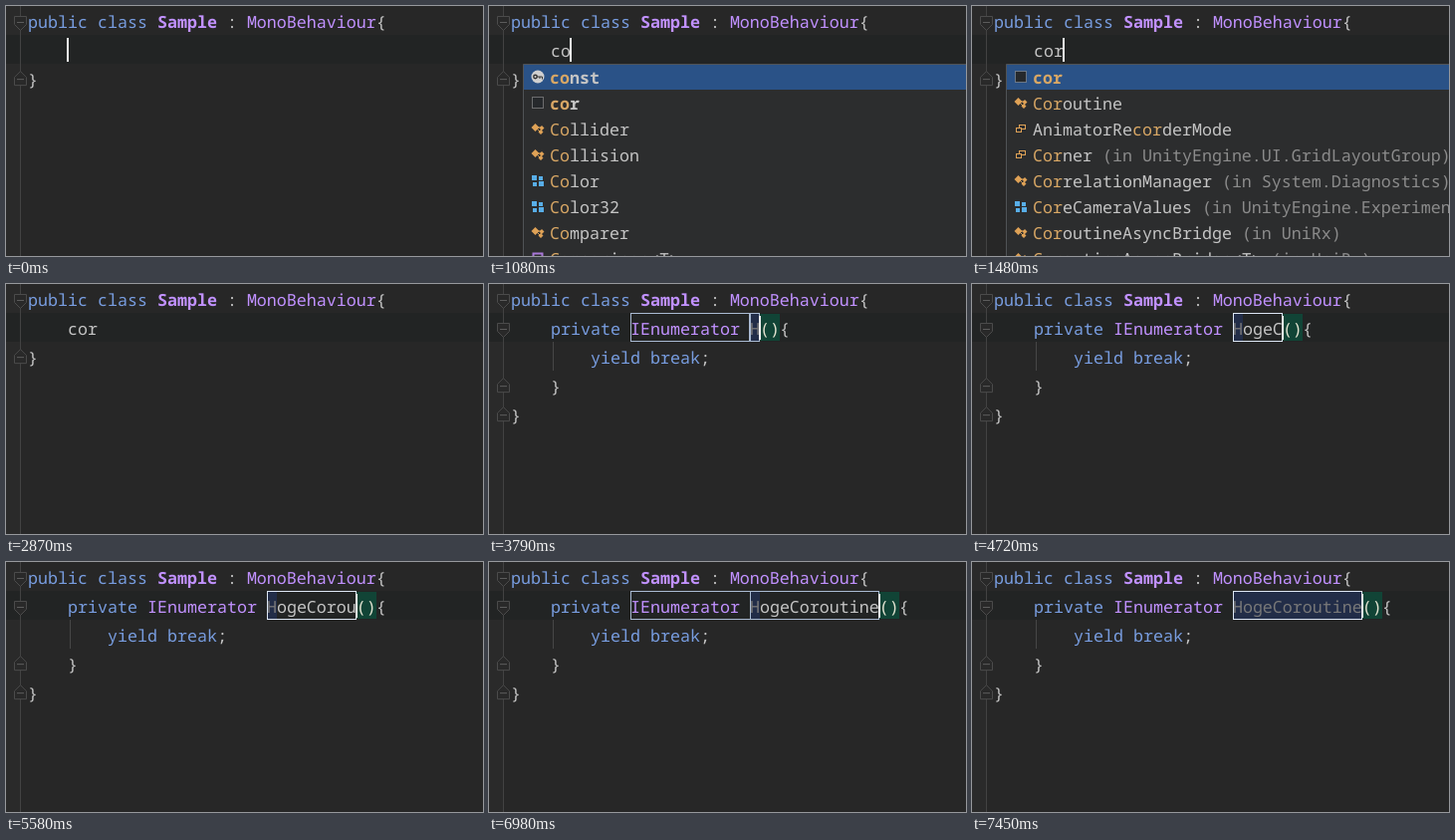
An HTML page for the animation above (7.77 s loop, 479 by 251 pixels).

```html
<!DOCTYPE html>
<html>
<head>
<meta charset="utf-8">
<style>
html, body { margin: 0; width: 100%; height: 100%; overflow: hidden; background: #272727; }
svg { display: block; }
text {
  font: 16.667px "Noto Sans Mono", "DejaVu Sans Mono", monospace;
  white-space: pre;
  text-rendering: geometricPrecision;
}
</style>
</head>
<body>
<svg id="stage" width="479" height="251" viewBox="0 0 479 251"></svg>
<script>
const LOOP = 7770, CH = 10, ROW = 29, NAME = 'HogeCoroutine', NAME_X = 262;
const KEY = '#789de0', TYPE = '#c191ff', PLAIN = '#c4c4c4', DIM = '#787878';
const MATCH = '#d8a765', SELECT = '#222d48', PAREN = '#114436';

// [time, typed length]
const PREFIX = [[0, 0], [700, 1], [1080, 2], [1400, 3]];
const TYPING = [[0, 0], [3790, 1], [3940, 2], [4190, 4], [4720, 5], [5120, 6], [5350, 7],
  [5500, 8], [5580, 9], [5730, 10], [5800, 11], [5880, 12], [6050, 13]];
// [time, left, right] of the template field outline; right 0 follows the name
const FIELD = [[0, 0, -1], [3030, 142, 252], [3790, 142, 262], [3870, 142, 272], [3940, 142, 0],
  [4020, NAME_X, 0], [6980, 142, 0], [7050, 142, 320], [7130, 142, 252], [7450, NAME_X, 0]];

const LIST_CO = [
  ['key', 'const'], ['snippet', 'cor'], ['class', 'Collider'], ['class', 'Collision'],
  ['struct', 'Color'], ['struct', 'Color32'], ['class', 'Comparer'], ['delegate', 'Comparison<T>']
];
const LIST_COR = [
  ['snippet', 'cor'], ['class', 'Coroutine'], ['enum', 'AnimatorRecorderMode'],
  ['enum', 'Corner', 'UnityEngine.UI.GridLayoutGroup'],
  ['class', 'CorrelationManager', 'System.Diagnostics'],
  ['struct', 'CoreCameraValues', 'UnityEngine.Experimental.Rendering'],
  ['class', 'CoroutineAsyncBridge', 'UniRx'], ['class', 'CoroutineAsyncBridge<T>', 'UniRx']
];

const at = (steps, t) => steps.filter(s => s[0] <= t).pop();
const esc = s => s.replace(/</g, '&lt;');
const rect = (x, y, w, h, fill, more = '') =>
  `<rect x="${x}" y="${y}" width="${w}" height="${h}" fill="${fill}" ${more}/>`;
const path = (d, stroke, fill = 'none', more = '') =>
  `<path d="${d}" stroke="${stroke}" fill="${fill}" ${more}/>`;
const text = (x, y, ...parts) => `<text x="${x}" y="${y}">` + parts.map(([fill, s, bold]) =>
  `<tspan fill="${fill}"${bold ? ' font-weight="700"' : ''}>${esc(s)}</tspan>`).join('') + '</text>';
const line = (row, x, ...parts) => text(x, 22 + ROW * row, ...parts);
const caret = x => rect(x - 1, 32, 2, 24, '#f0f0f0');

function fold(row, up) {
  const y = 16.5 + ROW * row, s = up ? -1 : 1;
  return path(`M8.5 ${y - 6 * s}H20.5V${y + 2 * s}L14.5 ${y + 8 * s}L8.5 ${y + 2 * s}Z`, '#4b4b4b', '#292929') +
    path(`M11 ${y}h7`, '#5c5c5c');
}

function icon(kind, y) {
  const box = (x, dy, w, c) => rect(x, y + dy, w, w, c);
  switch (kind) {
    case 'key':
      return `<circle cx="49" cy="${y}" r="6.5" fill="#d0d0d0"/><circle cx="46.5" cy="${y}" r="1.7" fill="none" stroke="#333" stroke-width="1.4"/>` +
        path(`M48 ${y}h5.5v2.5M51 ${y}v2`, '#333');
    case 'snippet':
      return rect(43.5, y - 5.5, 11, 11, '#26292c', 'stroke="#b0b0b0" stroke-dasharray="1 1"');
    case 'class':
      return path(`M46.5 ${y - 5}l4 4l-4 4l-4-4Z M53 ${y - 3}l2.5 2.5l-2.5 2.5l-2.5-2.5Z M52 ${y + 1}l2.5 2.5l-2.5 2.5l-2.5-2.5Z`, 'none', '#dfa256') +
        path(`M47 ${y - 1}h5M48 ${y}l4 4`, '#dfa256');
    case 'struct':
      return box(43, -5, 5, '#58aee8') + box(50, -4, 4, '#58aee8') +
        box(44, 2, 4, '#58aee8') + box(50, 1, 5, '#58aee8');
    case 'enum':
      return rect(47.5, y - 3.5, 6, 4, 'none', 'stroke="#dfa256"') +
        rect(44.5, y - .5, 5, 4, '#2d2e30', 'stroke="#dfa256"');
    default:
      return rect(44.5, y - 4.5, 9, 9, 'none', 'stroke="#a878d8" stroke-width="2"');
  }
}

function popup(list, query) {
  let out = rect(34, 58, 446, 194, '#2c2d2e') + rect(35, 58, 445, 26, '#2a5287') +
    path('M34.5 251V58.5H479', '#505356');
  list.forEach(([kind, name, space], i) => {
    const y = 72 + 26 * i, bold = kind == 'key' || kind == 'snippet';
    const from = name.toLowerCase().indexOf(query), to = from + query.length;
    out += icon(kind, y - 1) + text(61, y + 6, [PLAIN, name.slice(0, from), bold],
      [MATCH, name.slice(from, to), bold], [PLAIN, name.slice(to), bold],
      ['#8b8b8b', space ? ` (in ${space})` : '']);
  });
  return out;
}

function prefixScene(t) {
  const n = at(PREFIX, t)[1];
  let out = fold(1.97, true) + line(1, 62, [PLAIN, 'cor'.slice(0, n)]) + line(2, 22, [PLAIN, '}']);
  if (t < 380 || t >= 700 && t < 2410) out += caret(62 + CH * n);
  if (t >= 780 && t < 2870) out += t < 1480 ? popup(LIST_CO, n > 1 ? 'co' : 'c') : popup(LIST_COR, 'cor');
  return out;
}

function templateScene(t) {
  const n = at(TYPING, t)[1], end = NAME_X + CH * n;
  const [, left, r] = at(FIELD, t), right = r || end;
  const onName = t >= 3790 && t < 7050 || t >= 7450;
  const dim = t >= 7300 ? n : Math.min(n, 1);
  let out = fold(1) + fold(2.97, true) + fold(3.97, true);
  if (t >= 3180) out += rect(64, 58, 1, ROW, '#474747');
  if (right == 252) out += rect(142, 30, 110, 27, SELECT);
  if (onName) out += rect(NAME_X, 30, CH * dim, 27, SELECT) + rect(end, 30, 20, 27, PAREN);
  out += line(1, 62, [KEY, 'private '], [TYPE, 'IEnumerator '], [DIM, NAME.slice(0, dim)],
    [PLAIN, NAME.slice(dim, n)], [onName ? '#e2e2d0' : PLAIN, '()'], [PLAIN, '{']);
  out += line(2, 102, [KEY, 'yield break'], [PLAIN, ';']) +
    line(3, 62, [PLAIN, '}']) + line(4, 22, [PLAIN, '}']);
  if (right > 0) {
    const outline = (a, b, c) => rect(a + .5, 29.5, b - a - 1, 28, 'none', `stroke="${c}"`);
    out += outline(left, right, left == 142 ? '#a9bad2' : '#dce6f4');
    if (onName && left == 142 && n) out += outline(NAME_X, end, '#a9bad2');
    out += caret(onName ? end : 252);
  }
  return out;
}

const stage = document.getElementById('stage');
let last = '';

function draw(now) {
  const t = now % LOOP;
  const svg = rect(0, 0, 479, 251, '#272727') + rect(0, 0, 14, 251, '#2a2a2a') +
    rect(0, ROW, 479, ROW, '#222424') + rect(14, 0, 1, 251, '#424242') + fold(0) +
    line(0, 22, [KEY, 'public class '], [TYPE, 'Sample', true], [PLAIN, ' : '],
      [TYPE, 'MonoBehaviour'], [PLAIN, '{']) +
    (t < 2950 ? prefixScene(t) : templateScene(t));
  if (svg != last) stage.innerHTML = last = svg;
}

const start = performance.now();
function tick() {
  draw(performance.now() - start);
  requestAnimationFrame(tick);
}
tick();
</script>
</body>
</html>
```
